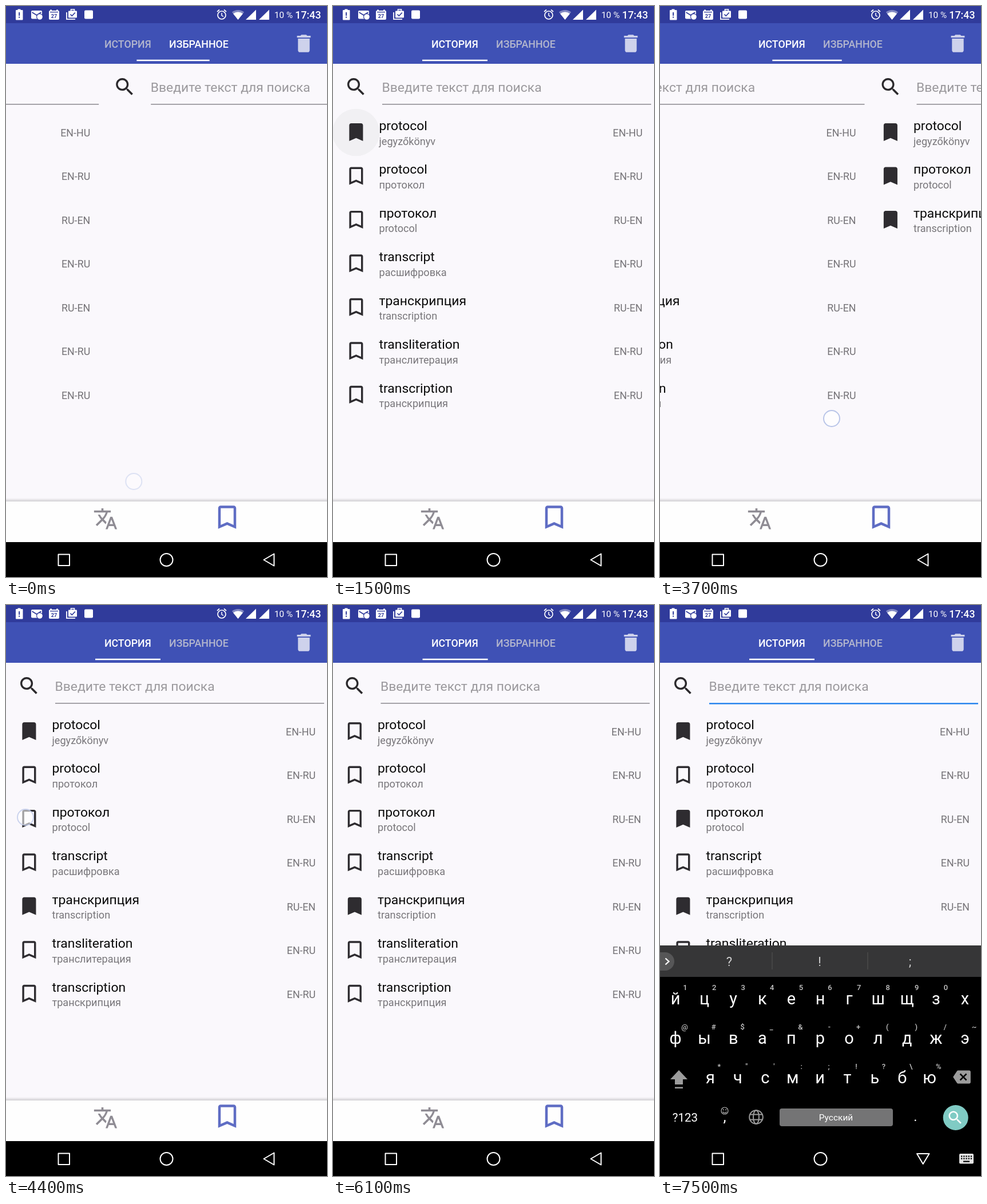
Recreate the animation shown at these times as an HTML page with a canvas. Size 561x998 px, loop 8 s.

```html
<!DOCTYPE html>
<html lang="ru">
<head>
<meta charset="utf-8">
<title>Translation history</title>
<style>
html, body { margin: 0; width: 100%; height: 100%; overflow: hidden; background: #faf8fc; }
canvas { display: block; width: 561px; height: 998px; }
</style>
</head>
<body>
<canvas id="stage"></canvas>
<script>
const W = 561, H = 998, LOOP = 8000, STEP = 100;
const canvas = document.getElementById('stage');
const dpr = window.devicePixelRatio || 1;
canvas.width = W * dpr;
canvas.height = H * dpr;
const ctx = canvas.getContext('2d');

const BG = '#faf8fc', INK = '#2e2c30', GREY = '#757377';
const ROW_Y = 221, ROW_H = 76.45;

// 24-unit icons
const ICON = {
  search: 'M15.5 14h-.79l-.28-.27C15.41 12.59 16 11.11 16 9.5 16 5.91 13.09 3 9.5 3S3 5.91 3 9.5 5.91 16 9.5 16c1.61 0 3.09-.59 4.23-1.57l.27.28v.79l5 4.99L20.49 19l-4.99-5zm-6 0C7.01 14 5 11.99 5 9.5S7.01 5 9.5 5 14 7.01 14 9.5 11.99 14 9.5 14z',
  mark: 'M17 3H7c-1.1 0-1.99.9-1.99 2L5 21l7-3 7 3V5c0-1.1-.9-2-2-2z',
  markOpen: 'M17 3H7c-1.1 0-1.99.9-1.99 2L5 21l7-3 7 3V5c0-1.1-.9-2-2-2zm0 15l-5-2.18L7 18V5h10v13z',
  trash: 'M6 19c0 1.1.9 2 2 2h8c1.1 0 2-.9 2-2V7H6v12zM19 4h-3.5l-1-1h-5l-1 1H5v2h14V4z',
  translate: 'M12.87 15.07l-2.54-2.51.03-.03c1.74-1.94 2.98-4.17 3.71-6.53H17V4h-7V2H8v2H1v1.99h11.17C11.5 7.92 10.44 9.75 9 11.35 8.07 10.32 7.3 9.19 6.69 8h-2c.73 1.63 1.73 3.17 2.98 4.56l-5.09 5.02L4 19l5-5 3.11 3.11.76-2.04zM18.5 10h-2L12 22h2l1.12-3h4.75L21 22h2l-4.5-12zm-2.62 7l1.62-4.33L19.12 17h-3.24z',
  erase: 'M22 3H7c-.69 0-1.23.35-1.59.88L0 12l5.41 8.11c.36.53.9.89 1.59.89h15c1.1 0 2-.9 2-2V5c0-1.1-.9-2-2-2zm-3 12.59L17.59 17 14 13.41 10.41 17 9 15.59 12.59 12 9 8.41 10.41 7 14 10.59 17.59 7 19 8.41 15.41 12 19 15.59z'
};
for (const k in ICON) ICON[k] = new Path2D(ICON[k]);

const WORDS = [
  ['protocol', 'jegyzőkönyv', 'EN-HU'],
  ['protocol', 'протокол', 'EN-RU'],
  ['протокол', 'protocol', 'RU-EN'],
  ['transcript', 'расшифровка', 'EN-RU'],
  ['транскрипция', 'transcription', 'RU-EN'],
  ['transliteration', 'транслитерация', 'EN-RU'],
  ['transcription', 'транскрипция', 'EN-RU']
];

// Bookmark taps
const TAPS = [
  { down: 1300, up: 1400, row: 0, x: 36, y: 219 },
  { down: 1600, up: 1700, row: 2, x: 36, y: 376 },
  { down: 2200, up: 2200, row: 4, x: 49, y: 514 },
  { down: 4400, up: 4400, row: 2, x: 34, y: 371 },
  { down: 4600, up: 4700, row: 0, x: 36, y: 218 },
  { down: 6300, up: 6400, row: 0, x: 36, y: 219 },
  { down: 6500, up: 6600, row: 2, x: 36, y: 373 }
];

// Finger paths as [time, x, y]
const FLING = [[300, 60, 815], [400, 95, 812], [500, 180, 805], [600, 370, 800], [700, 460, 800]];
const PEEK_A = [[2700, 512, 690], [2800, 470, 700], [2900, 330, 712], [3000, 180, 722], [3100, 106, 726],
  [3300, 76, 729], [3400, 78, 729], [3500, 95, 728], [3600, 170, 726], [3800, 430, 716]];
const PEEK_B = [[5100, 480, 600], [5200, 400, 596], [5300, 230, 590], [5400, 120, 585], [5500, 125, 583],
  [5600, 182, 582], [5800, 370, 582], [5900, 430, 584]];

const within = (path, t) => t >= path[0][0] && t <= path[path.length - 1][0];
const clamp = v => Math.min(1, Math.max(0, v));

function along(path, t, col) {
  if (t <= path[0][0]) return path[0][col];
  for (let i = 1; i < path.length; i++) {
    const a = path[i - 1], b = path[i];
    if (t <= b[0]) return a[col] + (b[col] - a[col]) * (t - a[0]) / (b[0] - a[0]);
  }
  return path[path.length - 1][col];
}

// 0 = history, 1 = favourites
function pagePos(t) {
  if (t < 400) return along([[0, .702], [100, .96], [200, 1]], t, 1);
  if (t <= 700) return clamp(1 - (along(FLING, t, 1) - 95) / W);
  if (t < 2700) return along([[700, .35], [800, .06], [900, 0]], t, 1);
  if (t <= 3800) return clamp((498.5 - along(PEEK_A, t, 1)) / W);
  if (t < 5100) return along([[3800, .122], [3900, .03], [4000, 0]], t, 1);
  if (t <= 5900) return clamp((467 - along(PEEK_B, t, 1)) / W);
  return along([[5900, .066], [6000, .02], [6100, .0045], [6200, 0]], t, 1);
}

function rect(x, y, w, h, color, r = 0) {
  ctx.fillStyle = color;
  ctx.beginPath();
  if (r) ctx.roundRect(x, y, w, h, r); else ctx.rect(x, y, w, h);
  ctx.fill();
}

function disc(x, y, r, color) {
  ctx.fillStyle = color;
  ctx.beginPath();
  ctx.arc(x, y, r, 0, 7);
  ctx.fill();
}

function ring(x, y, r, color, w) {
  ctx.strokeStyle = color;
  ctx.lineWidth = w;
  ctx.beginPath();
  ctx.arc(x, y, r, 0, 7);
  ctx.stroke();
}

function poly(pts, color, w, close) {
  ctx.beginPath();
  pts.forEach(p => ctx.lineTo(p[0], p[1]));
  if (close) ctx.closePath();
  if (w) {
    ctx.strokeStyle = color;
    ctx.lineWidth = w;
    ctx.stroke();
  } else {
    ctx.fillStyle = color;
    ctx.fill();
  }
}

function text(s, x, y, size, color, align = 'left', weight = 400) {
  ctx.font = `${weight} ${size}px Roboto, sans-serif`;
  ctx.textAlign = align;
  ctx.fillStyle = color;
  ctx.fillText(s, x, y);
}

// Centred on x, y
function icon(name, x, y, scale, color) {
  ctx.save();
  ctx.translate(x - 12 * scale, y - 12 * scale);
  ctx.scale(scale, scale);
  ctx.fillStyle = color;
  ctx.fill(ICON[name]);
  ctx.restore();
}

function statusBar() {
  const bar = '#303b9b', w = '#fff';
  rect(0, 0, W, 30, bar);
  rect(20.5, 5.5, 5, 3, w);
  rect(17, 7, 12.5, 17.5, w, 1);
  rect(22.2, 11, 2, 6, bar);
  rect(22.2, 18.5, 2, 2.2, bar);

  rect(44, 8, 19, 14.5, w, 2);
  poly([[45.5, 11], [53.5, 16], [61.5, 11]], bar, 1.7);
  disc(59, 19, 6, bar);
  disc(59, 19, 4.8, w);

  rect(75, 8, 18, 16, w, 2);
  rect(77, 6.5, 3, 3, w);
  rect(88, 6.5, 3, 3, w);
  rect(77, 10, 14, 1.3, bar);
  text('27', 84, 20.5, 9, bar, 'center', 700);

  rect(109, 8.5, 15, 12, w, 1);
  ctx.strokeStyle = w;
  ctx.lineWidth = 1.6;
  ctx.strokeRect(113.5, 6, 6, 3);
  poly([[106, 11], [106, 23.2], [121, 23.2]], w, 1.8);
  poly([[112.5, 14.5], [115.3, 17.3], [120.8, 11.5]], bar, 1.7);

  rect(137, 7.5, 15, 15, w, 2);

  ring(377, 16, 7, w, 1.7);
  poly([[377, 12], [377, 16.5], [380, 18.5]], w, 1.5);
  poly([[369, 10], [373, 6.5]], w, 1.7);
  poly([[381, 6.5], [385, 10]], w, 1.7);

  const fan = (r, c) => {
    ctx.fillStyle = c;
    ctx.beginPath();
    ctx.moveTo(405.5, 24);
    ctx.arc(405.5, 24, r, -Math.PI * .715, -Math.PI * .285);
    ctx.fill();
  };
  fan(17, 'rgba(255,255,255,.4)');
  fan(13.5, w);
  for (const x of [419, 442]) poly([[x, 24], [x + 18, 6.5], [x + 18, 24]], w);
  text('10 %', 469, 21, 15.3, w);
  text('17:43', 550.5, 21.8, 17.8, w, 'right', 500);
}

function toolbar(pos, bar) {
  rect(0, 30, W, 71, '#3f51b5');
  const fav = pos >= .5, dim = '#b3b6cd';
  text('ИСТОРИЯ', 212.8, 72.5, 17.8, fav ? dim : '#fff', 'center', 500);
  text('ИЗБРАННОЕ', 337, 72.5, 17.8, fav ? '#fff' : dim, 'center', 500);
  const left = 156 + 114 * bar, right = 270 + 135 * bar;
  rect(left, 93.7, right - left, 2.5, '#fff');
  icon('trash', 520.5, 65.5, 1.7, '#ced2ec');
}

function page(x, rows, marked, t, focus) {
  if (x >= W || x <= -W) return;
  ctx.save();
  ctx.translate(x, 0);
  icon('search', 40.3, 141.3, 1.7, '#2b292c');
  text('Введите текст для поиска', 85.5, 150, 22.9, '#9b999d');
  if (focus) rect(86, 171, 470, 2.6, '#2a86ee');
  else rect(86, 171, 470, 1.4, '#8a888e');
  rows.forEach((r, i) => {
    const y = ROW_Y + ROW_H * i, [word, sub, lang] = WORDS[r];
    if (TAPS.some(k => k.row === r && t === k.up + STEP)) disc(40.3, y, 41.3, '#f1f0f3');
    icon(marked[r] ? 'mark' : 'markOpen', 40.4, y - .5, 1.72, INK);
    text(word, 80.5, y - 4, 22.9, '#0a0a0a');
    text(sub, 80.5, y + 21.5, 18.1, '#78767a');
    text(lang, 541, y + 7, 17.8, GREY, 'right');
  });
  ctx.restore();
}

function bottomBar() {
  const g = ctx.createLinearGradient(0, 860, 0, 866);
  g.addColorStop(0, 'rgba(0,0,0,0)');
  g.addColorStop(1, 'rgba(0,0,0,.16)');
  ctx.fillStyle = g;
  ctx.fillRect(0, 860, W, 6);
  rect(0, 866, W, 71, '#fefefe');
  icon('translate', 174, 896.3, 1.83, '#8f8c94');
  icon('markOpen', 386.5, 893.5, 2.25, '#5f6dc4');
}

function keyRow(letters, hints, x, y, step, shift) {
  [...letters].forEach((c, i) => {
    text(c, x + step * i, y, 29, '#fff', 'center');
    if (hints[i]) text(hints[i], x + step * i + shift, y - 25, 13, '#c4c4c4', 'center', 500);
  });
}

function keyboard(dy) {
  const grey = '#9c9c9c';
  ctx.save();
  ctx.translate(0, dy);
  rect(0, 595, W, 55, '#363637');
  rect(0, 650, W, 348, '#000');
  rect(-16, 607, 41, 32, '#565657', 16);
  poly([[9.5, 617.5], [15.5, 623], [9.5, 628.5]], '#fff', 2.3);
  rect(195.5, 607, 1, 30, '#555');
  rect(362.5, 607, 1, 30, '#555');
  ['?', '!', ';'].forEach((c, i) => text(c, 121 + 158 * i, 631, 22, '#d0d0d0', 'center'));

  keyRow('йцукенгшщзх', '1234567890', 27, 697.5, 50.6, 17);
  keyRow('фывапролджэ', '@#$_&-+()/~', 27, 766.5, 50.6, 16);
  keyRow('ячсмитьбю', '*"\':;!?\\%', 88, 836, 47.9, 15.5);

  poly([[33, 813], [48, 829], [40, 829], [40, 838], [26, 838], [26, 829], [18, 829]], grey);
  rect(26, 842.5, 14, 2.5, grey);
  icon('erase', 527.5, 825, 1.28, grey);

  text('?123', 44, 902.5, 20.5, '#fff', 'center');
  text(',', 113, 903, 26, '#fff', 'center');
  ring(113, 884, 6, '#b5b5b5', 1.2);
  disc(110.8, 882.3, 1, '#b5b5b5');
  disc(115.2, 882.3, 1, '#b5b5b5');
  ctx.beginPath();
  ctx.arc(113, 884.5, 3.3, .3, Math.PI - .3);
  ctx.stroke();

  ring(168, 895, 11.8, grey, 2);
  ctx.beginPath();
  ctx.ellipse(168, 895, 5, 11.8, 0, 0, 7);
  ctx.stroke();
  poly([[157, 890.5], [179, 890.5]], grey, 2);
  poly([[157, 899.5], [179, 899.5]], grey, 2);

  rect(209, 880, 198, 31, '#747475', 4);
  text('Русский', 307.5, 900.5, 15.5, '#fff', 'center');
  text('.', 446.5, 902, 24, '#fff', 'center');
  disc(516.7, 896, 22, '#80cbc4');
  icon('search', 516, 896, 1.28, '#fff');
  ctx.restore();
}

function navBar(typing) {
  rect(0, 937, W, 61, '#000');
  ctx.lineJoin = 'round';
  poly([[91.5, 958.5], [111, 958.5], [111, 978], [91.5, 978]], '#fff', 2, true);
  ring(280.5, 968, 11, '#fff', 2);
  if (typing) {
    poly([[449, 959], [470.5, 959], [459.7, 977]], '#fff', 2, true);
    rect(523, 959, 25, 17.5, '#e4e4e4', 2);
    for (let i = 0; i < 5; i++) {
      rect(526 + 4.2 * i, 962.5, 2.3, 2.2, '#000');
      rect(526 + 4.2 * i, 966.5, 2.3, 2.2, '#000');
    }
    rect(530, 971.5, 11, 2.2, '#000');
  } else {
    poly([[450.5, 968], [468.5, 957.5], [468.5, 978.5]], '#fff', 2, true);
  }
  ctx.lineJoin = 'miter';
}

function touch(x, y, alpha) {
  ctx.save();
  ctx.globalAlpha = alpha;
  disc(x, y, 14.5, 'rgba(255,255,255,.75)');
  ring(x, y, 14, '#b9c5e8', 2);
  ctx.restore();
}

function touches(t) {
  if (t < STEP) touch(223.3, 831, .45);
  for (const path of [FLING, PEEK_A, PEEK_B])
    if (within(path, t)) touch(along(path, t, 1), along(path, t, 2), 1);
  for (const k of TAPS)
    if (t >= k.down && t <= k.up) touch(k.x, k.y, .75);
  if (t === 6900) touch(300, 139, 1);
}

function draw(t) {
  const pos = pagePos(t);
  const marked = WORDS.map((_, i) => TAPS.filter(k => k.row === i && t >= k.up).length % 2 === 1);
  const all = WORDS.map((_, i) => i);
  const typing = t >= 7100;
  ctx.setTransform(dpr, 0, 0, dpr, 0, 0);
  rect(0, 0, W, H, BG);
  page(-pos * W, all, marked, t, t >= 7000);
  page((1 - pos) * W, all.filter(i => marked[i]), marked, -1, false);
  bottomBar();
  statusBar();
  toolbar(pos, t < STEP ? .635 : pos); // the bar trails while settling
  if (typing) keyboard(along([[7100, 190], [7200, 50], [7300, 8], [7400, 0]], t, 1));
  navBar(typing);
  touches(t);
}

let start = null;
function tick(now) {
  if (start === null) start = now;
  const t = (now - start) % LOOP;
  draw(Math.floor(t / STEP) * STEP);
  requestAnimationFrame(tick);
}
draw(0);
requestAnimationFrame(tick);
</script>
</body>
</html>
```
